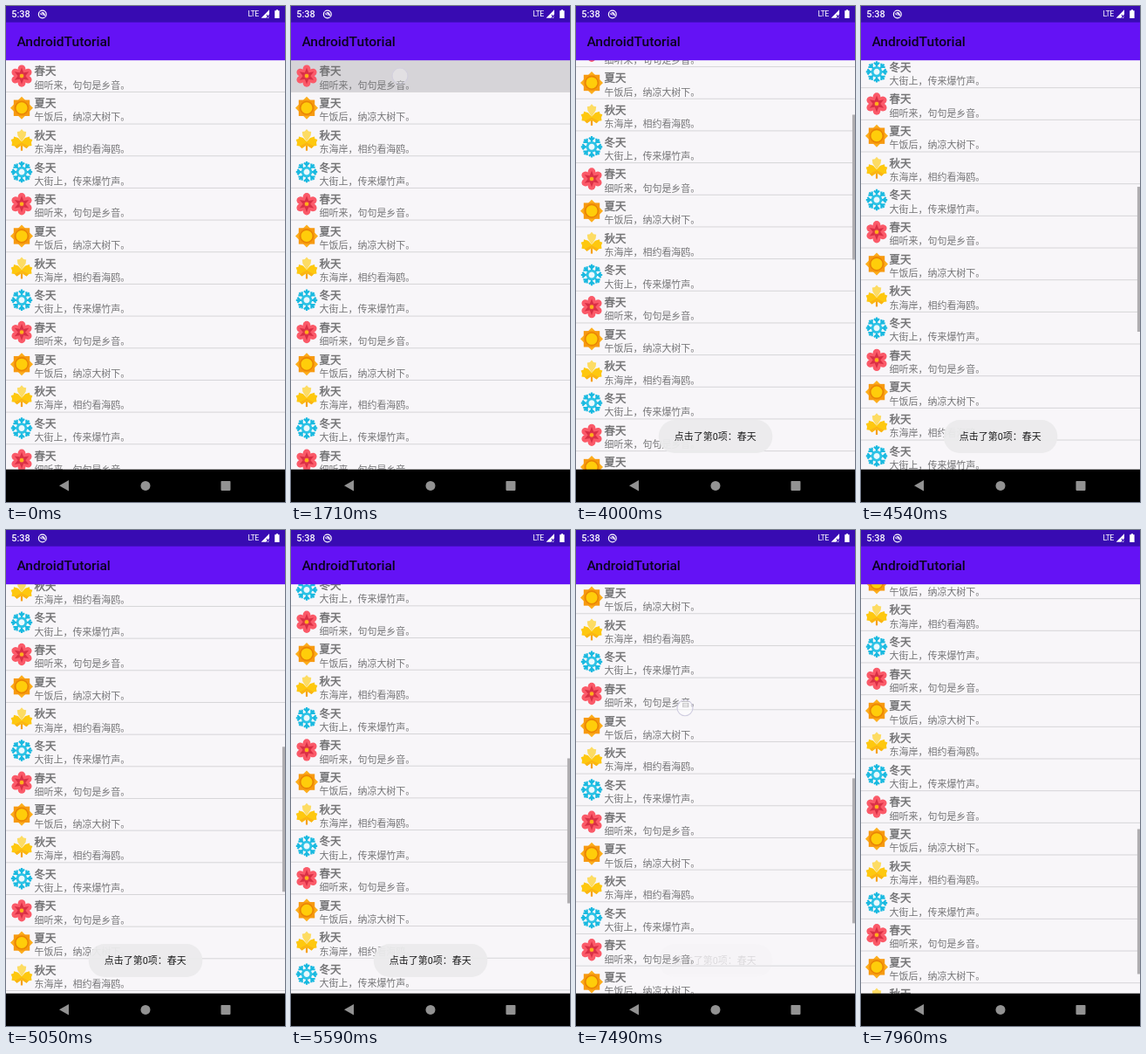
An HTML page that plays this animation: 320 by 568 pixels, repeating every 8000 ms.

```html
<!DOCTYPE html>
<html lang="zh-CN">
<head>
<meta charset="utf-8">
<title>AndroidTutorial</title>
<style>
html, body { margin: 0; width: 100%; height: 100%; overflow: hidden; background: #000; }
svg { display: block; width: 320px; height: 568px; }
text { font-family: Roboto, "Noto Sans CJK SC", "Noto Sans CJK", sans-serif; }
.name { font-size: 12.44px; fill: #707072; stroke: #707072; stroke-width: .45px; }
.line { font-size: 10.97px; fill: #757577; }
</style>
</head>
<body>
<svg viewBox="0 0 320 568">
  <defs>
    <clipPath id="view"><rect y="62" width="320" height="469"/></clipPath>
    <g id="spring"></g>
    <g id="summer">
      <path d="M0-13 13 0 0 13-13 0Z" fill="#fdae1c"/>
      <path d="M-9.2-9.2H9.2V9.2H-9.2Z" fill="#f79a10"/>
      <circle r="7.3" fill="#ffcd0a" stroke="#ea8504" stroke-width="1.6"/>
    </g>
    <g id="autumn">
      <path d="M0 2V12.3" stroke="#f6a01a" stroke-width="2.2"/>
      <path d="M0-12.5 2.2-10 5.2-9.5 4.6-5 0 2-4.6-5-5.2-9.5-2.2-10Z" fill="#fddc63"/>
      <path d="M0 2-4-2.5-9-4-9.3-1.5-12.3-.5-11 3-11.5 6.5-8 7-5.5 9.5 0 6 5.5 9.5 8 7 11.5 6.5 11 3 12.3-.5 9.3-1.5 9-4 4-2.5Z" fill="#fec80f"/>
      <path d="M0 5-5.5 9.5-8 7 0 3 8 7 5.5 9.5Z" fill="#fbb414"/>
    </g>
    <g id="winter"></g>
  </defs>

  <rect width="320" height="568" fill="#f8f6f9"/>
  <g clip-path="url(#view)">
    <rect id="press" y="62" width="320" height="36.2" fill="#d6d4d8"/>
    <g id="list"></g>
    <rect id="bar" x="316.9" width="3.1" height="166" fill="#b0aeb1"/>
  </g>

  <rect width="320" height="19" fill="#380bb2"/>
  <rect y="18.7" width="320" height="43.5" fill="#6412f5"/>
  <text x="12.4" y="46.1" font-size="15.56" font-weight="500" fill="#0c0320">AndroidTutorial</text>
  <g fill="#fff">
    <text x="6.3" y="13.4" font-size="10.89" font-weight="500">5:38</text>
    <circle cx="41.8" cy="9.5" r="4.4" fill="none" stroke="#fff" stroke-width="1.2"/>
    <path d="M39 9.2a2.9 2.9 0 0 1 5.6 0L45 12Z"/>
    <path d="M39 6.5 45 12.7" stroke="#380bb2"/>
    <text x="277.6" y="12.4" font-size="8.8" letter-spacing="-.6">LTE</text>
    <path d="M302 4.3V13.7H292.6Z"/>
    <path d="m298.8 10.2 3.4 3.4m0-3.4-3.4 3.4" stroke="#380bb2" stroke-width="1.1"/>
    <path d="M309.8 4.2h2.2v1h1.6v8.8h-5.4V5.2h1.6Z"/>
  </g>

  <rect y="530.7" width="320" height="37.3" fill="#000"/>
  <g fill="#929292">
    <path d="M61 549.3 72 543V555.6Z"/>
    <circle cx="160" cy="549.4" r="5.5"/>
    <rect x="246.5" y="543.9" width="11" height="11" rx=".8"/>
  </g>

  <g id="toast">
    <rect x="94.8" y="474" width="130.5" height="38" rx="18.5" fill="#ebebec" fill-opacity=".95"/>
    <text x="159.8" y="497.2" font-size="10.97" text-anchor="middle" fill="#1c1c1d">点击了第0项：春天</text>
  </g>
  <circle id="touch" r="9" fill="#fff" fill-opacity=".45" stroke="#d0cde0" stroke-width="1.2"/>
</svg>
<script>
const $ = id => document.getElementById(id);
const ROW = 36.67, TOP = 62.2, VIEW = 468.5, COUNT = 36, LOOP = 8000;
const seasons = [
  ['spring', '春天', '细听来，句句是乡音。'],
  ['summer', '夏天', '午饭后，纳凉大树下。'],
  ['autumn', '秋天', '东海岸，相约看海鸥。'],
  ['winter', '冬天', '大街上，传来爆竹声。']
];

const spin = (n, shape) => Array.from({ length: n },
  (_, i) => `<g transform="rotate(${i * 360 / n})">${shape}</g>`).join('');

$('spring').innerHTML =
  spin(6, '<ellipse cy="-7.8" rx="4.4" ry="4.9" fill="#fb5a69"/>') +
  spin(6, '<path d="M0-9.5 2.4-3 0 0-2.4-3Z" fill="#d92f45"/>') +
  '<circle r="3.6" fill="#e2374a"/><circle r="2.3" fill="#ffb01a"/>';
$('winter').innerHTML =
  spin(8, '<path d="M0-4V-12.2M-3-10.6 0-7.6 3-10.6" fill="none" stroke="#18b9e0" stroke-width="2.2"/>') +
  '<circle r="4.9" fill="#e9f9fd" stroke="#2cc3e6" stroke-width="2.8"/>';

$('list').innerHTML = Array.from({ length: COUNT }, (_, i) => {
  const [icon, name, line] = seasons[i % 4];
  return `<g transform="translate(0 ${TOP + i * ROW})">
    <use href="#${icon}" x="18" y="17.9"/>
    <text class="name" x="32.6" y="17.3">${name}</text>
    <text class="line" x="32.6" y="32.6">${line}</text>
    <rect y="35.7" width="320" height="1" fill="#d6d5d8"/></g>`;
}).join('');

// Scroll offset over time: a long fling, then a second drag
const path = [[3550, 0], [3680, 18], [4000, 175], [4300, 322], [4540, 407.8],
  [4800, 480], [5050, 524.3], [5150, 526], [5600, 562], [6170, 579.2], [6270, 579.2],
  [7080, 581], [7300, 594], [7490, 625.8], [7700, 710], [7960, 789.7], [8000, 793]];

const slope = path.map((p, i) => {
  const a = path[i - 1], b = path[i + 1];
  if (!a || !b) return 0;
  const l = (p[1] - a[1]) / (p[0] - a[0]), r = (b[1] - p[1]) / (b[0] - p[0]);
  return l * r > 0 ? 2 * l * r / (l + r) : 0;
});

// Monotone cubic through the path points
function scrollAt(t) {
  if (t <= path[0][0]) return 0;
  const i = path.findIndex(p => p[0] >= t) - 1;
  const [t0, s0] = path[i], [t1, s1] = path[i + 1], d = t1 - t0, u = (t - t0) / d;
  const e = u * u * (3 - 2 * u);
  return s0 + (s1 - s0) * e
    + d * u * (1 - u) * ((1 - u) * slope[i] - u * slope[i + 1]);
}

const ramp = (t, a, b) => Math.min(1, Math.max(0, (t - a) / (b - a)));
const pulse = (t, a, b, c, d) => ramp(t, a, b) * (1 - ramp(t, c, d));

function touchAt(t, s) {
  if (t < 2000) return [125, 80, pulse(t, 1430, 1480, 1680, 1760)];
  if (t < 5000) return [130, 400 - s, pulse(t, 3540, 3580, 3900, 3960)];
  return [125, 829.8 - s, pulse(t, 7040, 7100, 7560, 7620)];
}

function draw(now) {
  const t = now % LOOP, s = scrollAt(t), [x, y, alpha] = touchAt(t, s);
  $('list').setAttribute('transform', `translate(0 ${-s})`);
  $('bar').setAttribute('y', TOP + s * VIEW / (COUNT * ROW));
  $('bar').setAttribute('opacity', ramp(t, 2250, 2450));
  $('press').setAttribute('opacity', pulse(t, 1480, 1600, 1750, 2150));
  $('toast').setAttribute('opacity', pulse(t, 1750, 2150, 7200, 7535));
  $('touch').setAttribute('transform', `translate(${x} ${y})`);
  $('touch').setAttribute('opacity', alpha);
}

const start = performance.now();
function tick() {
  draw(performance.now() - start);
  requestAnimationFrame(tick);
}
tick();
</script>
</body>
</html>
```
